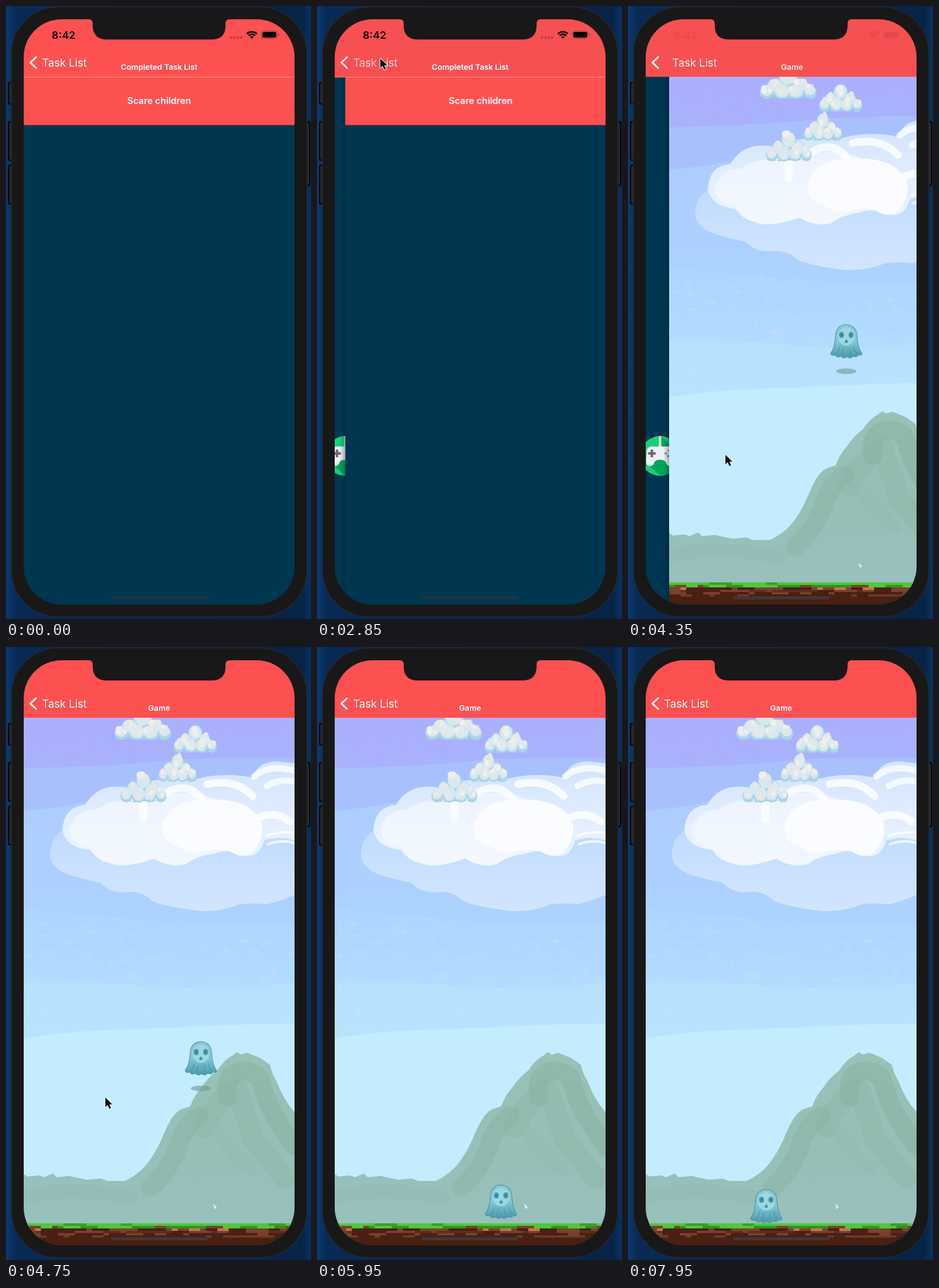
Animation, 482 px wide and 970 px high, one loop 8 s. Source, as an HTML page with a canvas:

```html
<!DOCTYPE html>
<html lang="en">
<head>
<meta charset="utf-8">
<title>Task list</title>
<style>
  html, body { margin: 0; width: 100%; height: 100%; overflow: hidden; background: #0a3163; }
  canvas { display: block; width: 482px; height: 970px; }
</style>
</head>
<body>
<canvas id="stage" width="482" height="970"></canvas>
<script>
const W = 482, H = 970, LOOP = 8000;
const LEFT = 28, TOP = 21, RIGHT = 456, BOTTOM = 947, BAR = 112, WIDE = RIGHT - LEFT;
const RED = '#fd5051', NAVY = '#003750';
const POP = 2829, PUSH = 4060, DROP = 4353;
const ctx = document.getElementById('stage').getContext('2d');

// ---------- helpers ----------
function layer(paint) {
  const c = document.createElement('canvas');
  c.width = W;
  c.height = H;
  paint(c.getContext('2d'));
  return c;
}

function seeded(seed) {
  return () => (seed = (seed * 16807) % 2147483647) / 2147483647;
}

function box(g, x, y, w, h, r, fill) {
  g.beginPath();
  g.roundRect(x, y, w, h, r);
  g.fillStyle = fill;
  g.fill();
}

function oval(g, x, y, rx, ry, fill) {
  g.beginPath();
  g.ellipse(x, y, rx, ry, 0, 0, Math.PI * 2);
  g.fillStyle = fill;
  g.fill();
}

function shape(g, d, fill) {
  g.fillStyle = fill;
  g.fill(new Path2D(d));
}

function line(g, d, color, width) {
  g.strokeStyle = color;
  g.lineWidth = width;
  g.lineCap = g.lineJoin = 'round';
  g.stroke(new Path2D(d));
}

function label(g, text, x, y, font, color, align = 'center', alpha = 1) {
  if (alpha <= 0) return;
  g.save();
  g.globalAlpha *= alpha;
  g.font = font + ' Inter, Roboto, sans-serif';
  g.textAlign = align;
  g.fillStyle = color;
  g.fillText(text, x, y);
  g.restore();
}

function fade(g, y0, y1, ...colors) {
  const f = g.createLinearGradient(0, y0, 0, y1);
  colors.forEach((c, i) => f.addColorStop(i / (colors.length - 1), c));
  return f;
}

// Critically damped spring, 0 to 1; t in ms.
function spring(t) {
  if (t <= 0) return 0;
  const k = t * 0.014;
  return k > 9 ? 1 : 1 - (1 + k) * Math.exp(-k);
}

// Keys are [time, ...values].
function along(keys, t, ease = u => u) {
  if (t <= keys[0][0]) return keys[0].slice(1);
  for (let i = 1; i < keys.length; i++) {
    const a = keys[i - 1], b = keys[i];
    if (t < b[0]) {
      const u = ease((t - a[0]) / (b[0] - a[0]));
      return a.slice(1).map((v, n) => v + (b[n + 1] - v) * u);
    }
  }
  return keys[keys.length - 1].slice(1);
}

const smooth = u => u * u * (3 - 2 * u);

// ---------- phone ----------
const body = layer(g => {
  const wall = g.createLinearGradient(0, 0, W, 0);
  wall.addColorStop(0, '#0b3a72');
  wall.addColorStop(0.03, '#082a55');
  wall.addColorStop(0.97, '#072447');
  wall.addColorStop(1, '#0a3163');
  g.fillStyle = wall;
  g.fillRect(0, 0, W, H);
  for (const [x, y, h] of [[3, 120, 36], [3, 182, 63], [3, 251, 63], [471, 182, 103]]) {
    box(g, x, y, 10, h, 3, '#050505');
    box(g, x + 2, y + 2, 6, h - 4, 2, '#262626');
  }
  box(g, 8, 1, 468, 966, 74, '#2e2c2c');
  box(g, 9, 2, 466, 964, 73, '#181818');
});

const notch = new Path2D(
  'M128 20V21H131Q137 21 137 28V31Q137 53 160 53H324Q347 53 347 31V28Q347 21 353 21H356V20Z');

function status(g, alpha) {
  if (alpha <= 0) return;
  g.save();
  g.globalAlpha = alpha;
  label(g, '8:42', 91, 51.5, '600 16.6px', '#120404');
  for (let i = 0; i < 4; i++) box(g, 354 + i * 5.4, 48, 3.6, 3.8, 1, '#b94042');
  g.fillStyle = '#140404';
  g.beginPath();
  g.moveTo(388.5, 52);
  g.arc(388.5, 52, 4.2, -Math.PI * 0.75, -Math.PI * 0.25);
  g.fill();
  g.strokeStyle = '#140404';
  g.lineWidth = 2.4;
  g.lineCap = 'butt';
  for (const r of [7.2, 11.2]) {
    g.beginPath();
    g.arc(388.5, 52, r, -Math.PI * 0.75, -Math.PI * 0.25);
    g.stroke();
  }
  g.beginPath();
  g.roundRect(403.5, 39.5, 25, 12, 4);
  g.strokeStyle = '#a83b3d';
  g.lineWidth = 1;
  g.stroke();
  box(g, 405, 41, 22, 9, 2.5, '#0a0202');
  box(g, 429.6, 43.5, 1.6, 4, 1, '#a83b3d');
  g.restore();
}

// ---------- pages ----------
const donePage = layer(g => {
  g.fillStyle = NAVY;
  g.fillRect(LEFT, BAR, WIDE, BOTTOM - BAR);
  g.fillStyle = RED;
  g.fillRect(LEFT, BAR, WIDE, 76);
  g.fillStyle = '#6d4250';
  g.fillRect(LEFT, 188, WIDE, 1);
  label(g, 'Scare children', 242, 155, '600 14.5px', '#fff');
});

const listPage = layer(g => {
  g.fillStyle = NAVY;
  g.fillRect(LEFT, BAR, WIDE, BOTTOM - BAR);

  g.save();
  g.beginPath();
  g.arc(168, 712, 31.5, 0, 7);
  g.clip();
  g.fillStyle = '#19cf76';
  g.fillRect(136, 680, 64, 64);
  shape(g, 'M170 681L202 713V746H172L146 724L170 700Z', '#07a55c');
  g.fillStyle = '#d7dde2';
  g.fillRect(166, 680, 4, 20);
  shape(g, 'M154 697H182Q188 697 189 704L190 720Q190 728 184 728Q179 728 177 722Q175 718 168 718' +
    'Q161 718 159 722Q157 728 152 728Q146 728 146 720L147 704Q148 697 154 697Z', '#eef0f4');
  g.fillStyle = '#666b73';
  g.fillRect(149, 706, 12, 4);
  g.fillRect(153, 702, 4, 12);
  oval(g, 181, 703.5, 2, 2, '#f2b73c');
  oval(g, 176.8, 708, 2, 2, '#4a9df0');
  oval(g, 185.2, 708, 2, 2, '#ee5160');
  oval(g, 181, 712.3, 2, 2, '#35bd88');
  g.restore();

  oval(g, 231, 712, 31.5, 31.5, '#1b87ee');
  line(g, 'M231 698V726M217 712H245', '#f5f8fd', 5);
  oval(g, 294, 712, 31.5, 31.5, '#20a27b');
  line(g, 'M278 713L289 723L311 700', '#f1f8f6', 2.8);
});

function puffs(g, x, y, w, h, rand) {
  g.save();
  g.translate(x, y);
  g.scale(w / 90, h / 46);
  const lumps = [[-33, 12, 11], [-20, 4, 13], [0, -8, 15], [19, 4, 13], [34, 12, 10], [-9, 12, 14], [12, 13, 13]];
  for (const [a, b, r] of lumps) oval(g, a, b + 1, r, Math.min(r, 22 - b), '#add6e9');
  for (const [a, b, r] of lumps) {
    oval(g, a, b - 2, r * 0.82, r * 0.75, '#d8e8ef');
    for (let i = 0; i < 3; i++) {
      oval(g, a + (rand() - 0.5) * r, b - 4 + (rand() - 0.5) * r, r * 0.38, r * 0.36,
        rand() < 0.5 ? '#f0efec' : '#e4e8ea');
    }
  }
  g.fillStyle = '#a7d1e7';
  for (let i = 0; i < 9; i++) g.fillRect(-40 + i * 9.3, 18 + rand() * 3, 7, 2);
  g.restore();
}

const gamePage = layer(g => {
  const rand = seeded(71);
  g.fillStyle = fade(g, BAR, 260, '#aaafff', '#a9b2fd', '#a9c3ff');
  g.fillRect(LEFT, BAR, WIDE, 200);
  shape(g, 'M28 192Q150 190 240 181T456 176V320H28Z', '#a9c0fe');
  shape(g, 'M28 259Q90 254 130 244T300 236T456 232V470H28Z', fade(g, 250, 420, '#aecdff', '#acd2fe'));
  shape(g, 'M28 414Q90 420 170 428T330 437T456 440V560H28Z', fade(g, 420, 545, '#aed5ff', '#b2dcff'));
  shape(g, 'M28 530Q80 524 150 531T300 540T456 530V640H28Z', fade(g, 530, 600, '#b6e0ff', '#b8e3ff'));
  shape(g, 'M28 620Q90 608 190 605T350 598L456 596V920H28Z', '#c3edff');

  // Soft paint texture
  for (let i = 0; i < 150; i++) {
    const y = 430 + rand() * 150;
    oval(g, LEFT + rand() * WIDE, y, 2 + rand() * 6, 1 + rand() * 3, 'rgba(196,231,255,.25)');
  }
  for (let i = 0; i < 40; i++) {
    oval(g, 40 + rand() * 160, 118 + rand() * 64, 4 + rand() * 6, 3 + rand() * 3, 'rgba(176,170,255,.2)');
  }

  // Painted cloud
  shape(g, 'M69 330Q70 302 90 290L130 300H456V392Q432 403 412 407Q390 404 370 407Q340 419 310 418' +
    'Q255 412 231 402Q214 385 190 388Q165 390 149 373Q128 369 112 364Q74 356 69 330Z',
    fade(g, 290, 418, '#bfdbff', '#cbe1fe', '#d2e5ff'));
  shape(g, 'M89 291Q91 252 125 250Q145 215 190 222Q240 204 290 212Q340 196 390 207Q398 180 430 181' +
    'L456 184V306Q430 298 408 306Q400 335 375 330Q347 318 330 327Q300 331 284 344' +
    'Q258 350 234 335Q185 352 164 342Q145 339 133 321Q96 318 89 291Z',
    fade(g, 200, 345, '#d5e5ff', '#e2edff', '#f0f6ff'));
  shape(g, 'M100 288Q112 255 140 258Q175 235 215 246Q280 220 330 240L350 322Q310 322 285 342' +
    'Q258 348 234 334Q185 350 164 340Q145 337 135 318Q105 315 100 288Z', 'rgba(246,250,255,.7)');
  line(g, 'M250 233Q285 210 310 241M318 217Q362 207 390 236M400 270Q425 258 448 276', 'rgba(255,255,255,.8)', 12);
  line(g, 'M392 205Q415 185 456 196M412 220Q432 208 456 213', 'rgba(255,255,255,.75)', 10);
  line(g, 'M217 240V272', 'rgba(255,255,255,.7)', 13);
  shape(g, 'M247 288Q250 243 320 241Q392 240 405 282Q407 306 388 326Q372 337 350 321' +
    'Q330 317 310 325Q288 329 273 315Q248 311 247 288Z', '#fafcff');
  line(g, 'M412 299Q430 291 456 294M414 312Q435 304 456 310', 'rgba(255,255,255,.75)', 4);

  puffs(g, 216, 123, 92, 48, rand);
  puffs(g, 299, 145, 70, 45, rand);
  puffs(g, 271, 191, 62, 45, rand);
  puffs(g, 217, 222, 74, 48, rand);

  // Hills
  const hill = 'M28 834L34 838L52 836L60 839L74 833L80 839L100 837L128 843L150 841L160 845L187 845' +
    'Q212 834 228 811Q240 794 250 769Q264 736 278 731L291 727Q298 708 308 698Q320 680 334 670' +
    'Q344 654 357 647L365 641L371 645L381 642L401 650L417 661Q420 675 427 686Q438 716 456 736V920H28Z';
  shape(g, hill, fade(g, 640, 912, '#99c1b7', '#96bfb7', '#98c1bd'));
  g.save();
  g.clip(new Path2D(hill));
  line(g, 'M228 855Q258 830 272 790Q282 757 305 742', 'rgba(135,174,157,.4)', 30);
  line(g, 'M350 712Q345 675 372 671Q400 671 403 690Q415 735 456 790', 'rgba(135,174,157,.48)', 30);
  line(g, 'M312 760Q335 715 365 700L392 780L440 840', 'rgba(135,174,157,.3)', 34);
  line(g, 'M330 765Q355 800 385 825M28 870Q110 852 200 872', 'rgba(142,181,171,.3)', 22);
  g.restore();
  shape(g, 'M327 881L333 886L330 890Z', '#d3f1f8');
});

const ground = layer(g => {
  const rand = seeded(23);
  const rows = [
    [912, 4, ['#4fc83b', '#4fc83b', '#3f9f28']],
    [916, 4, ['#32901f', '#4fc83b', '#369423', '#74432c']],
    [920, 4, ['#4c2014', '#7b422d', '#c1764c', '#4c2014']],
    [924, 3.5, ['#4c2014', '#7b422d', '#5e2e20']],
    [927.5, 3.5, ['#4a1f14', '#4a1f14', '#7b422d']],
    [931, 3.5, ['#4a1f14', '#4a1f14', '#4a1f14', '#6e3a28']]
  ];
  g.fillStyle = '#4a1f14';
  g.fillRect(LEFT, 920, WIDE, 30);
  for (const [y, h, colors] of rows) {
    for (let x = LEFT; x < RIGHT;) {
      const w = 9 + Math.floor(rand() * 3) * 9;
      g.fillStyle = colors[Math.floor(rand() * colors.length)];
      g.fillRect(x, y, w, h);
      x += w;
    }
  }
});

const cloak = 'M0 -26C-11 -26 -17 -18 -17 -7C-18 6 -20 14 -25 20Q-22 25 -18 22Q-14 28 -9 24' +
  'Q-4 29 1 25Q6 29 11 24Q17 27 19 22Q23 24 25 20C20 14 18 6 17 -7C17 -18 11 -26 0 -26Z';

function ghost(g, x, y) {
  g.save();
  g.translate(x, y);
  oval(g, 0, 48, 16, 4.5, 'rgba(108,156,154,.6)');
  shape(g, cloak, fade(g, -26, 26, '#8bc6d4', '#83c6d2', '#4a9bb0'));
  line(g, cloak, 'rgba(72,139,157,.75)', 1.2);
  oval(g, 0, -7, 13.5, 14.5, '#9ad8e2');
  line(g, 'M-11 10Q-12 17 -16 21M-4 12L-7 22M5 12L7 22M12 9Q13 17 18 20', 'rgba(61,137,157,.55)', 1.4);
  for (const s of [-7.5, 7.5]) {
    oval(g, s, -9.5, 4, 5, '#4a9aaa');
    oval(g, s, -9.5, 1.8, 2.5, '#3b8496');
  }
  shape(g, 'M0 -3Q3 0 2.5 3H-2.5Q-3 0 0 -3Z', '#4593a5');
  g.restore();
}

function ghostPlace(t) {
  const s = Math.max(0, t - DROP) / 1000;
  const hover = 880.3 + 4 * Math.sin((t - 7950) / 840 * Math.PI * 2 + Math.PI / 2);
  const [x] = along([[5600, 308], [5950, 291], [6950, 208.5], [7950, 218.5]], t);
  return [x, Math.min(hover, 530 + 760 * s * s)];
}

// ---------- navigation ----------
const pages = {
  list: { title: 'Task List', back: 'Add Task' },
  done: { title: 'Completed Task List', back: 'Task List' },
  game: { title: 'Game', back: 'Task List' }
};

// q is how far the child page is shown.
function navBar(g, child, q, pressed) {
  const titleFont = '600 12.4px', backFont = '400 17px';
  const parent = pages.list;
  g.fillStyle = q > 0 && q < 1 || pressed ? '#f75052' : RED;
  g.fillRect(LEFT, TOP, WIDE, BAR - TOP);
  label(g, parent.title, 242 - q * 150, 100.5, titleFont, '#fff', 'center', 1 - q * 1.5);
  label(g, parent.back, 57 - q * 90, 96, backFont, '#fff', 'left', 1 - q * 2);
  label(g, child.title, 242 + (1 - q) * 200, 100.5, titleFont, '#fff', 'center', q);
  label(g, child.back, 57 + (1 - q) * 150, 96, backFont, '#fff', 'left', q * (pressed ? 0.72 : 1));
  line(g, 'M47.5 81L38.5 89.5L47.5 98', pressed ? '#fde0e0' : '#fff', 2.8);
}

function edgeShadow(g, x) {
  const s = g.createLinearGradient(x - 9, 0, x, 0);
  s.addColorStop(0, 'rgba(0,20,40,0)');
  s.addColorStop(1, 'rgba(0,20,40,.3)');
  g.fillStyle = s;
  g.fillRect(x - 9, BAR, 9, BOTTOM - BAR);
}

const path = [
  [2050, 236, 250], [2600, 100, 83], [3300, 100, 83], [3820, 152.5, 709],
  [4200, 152.5, 709], [4600, 157, 713]
];

function pointer(g, t) {
  if (t < 2050 || t > 5100) return;
  const [x, y] = along(path, t, smooth);
  const arrow = 'M0 0V15L3.6 11.8L6.2 17.6L8.8 16.4L6.3 10.7H11Z';
  g.save();
  g.translate(x, y);
  line(g, arrow, '#e8eef2', 2);
  shape(g, arrow, '#0a0a0a');
  g.restore();
}

// ---------- frame ----------
function draw(t) {
  const early = t < 3700;
  const shown = early ? 1 - spring(t - POP) : spring(t - PUSH);
  const bar = early ? 1 - spring(t - POP - 25) : shown;
  const shift = (1 - shown) * WIDE;
  const pressed = t >= 2760 && t < 3050;

  ctx.drawImage(body, 0, 0);
  ctx.save();
  ctx.beginPath();
  ctx.roundRect(LEFT, TOP, WIDE, BOTTOM - TOP, 60);
  ctx.clip();
  ctx.fillStyle = NAVY;
  ctx.fillRect(LEFT, TOP, WIDE, BOTTOM - TOP);

  if (shown < 1) ctx.drawImage(listPage, -0.3 * WIDE * shown, 0);
  if (shown > 0) {
    if (shown < 1) edgeShadow(ctx, LEFT + shift);
    if (early) {
      ctx.drawImage(donePage, shift, 0);
    } else {
      ctx.save();
      ctx.translate(shift, 0);
      ctx.beginPath();
      ctx.rect(LEFT, BAR, WIDE, BOTTOM - BAR);
      ctx.clip();
      ctx.drawImage(gamePage, 0, 0);
      ghost(ctx, ...ghostPlace(t));
      ctx.drawImage(ground, 0, 0);
      ctx.restore();
    }
  }

  navBar(ctx, early ? pages.done : pages.game, bar, pressed);
  if (early && shown > 0) {
    ctx.globalAlpha = shown;
    ctx.fillStyle = '#fc8a8a';
    ctx.fillRect(LEFT, BAR, WIDE, 1);
    ctx.globalAlpha = 1;
  }
  status(ctx, early ? 1 : 1 - shown);
  const dark = !early && shown > 0.5;
  box(ctx, 165.5, 934, 153, 5, 2.5, dark ? '#3d3835' : '#1d3442');
  ctx.restore();

  ctx.fillStyle = '#181818';
  ctx.fill(notch);
  pointer(ctx, t);
}

const start = performance.now();
function tick() {
  draw((performance.now() - start) % LOOP);
  requestAnimationFrame(tick);
}
tick();
</script>
</body>
</html>
```
